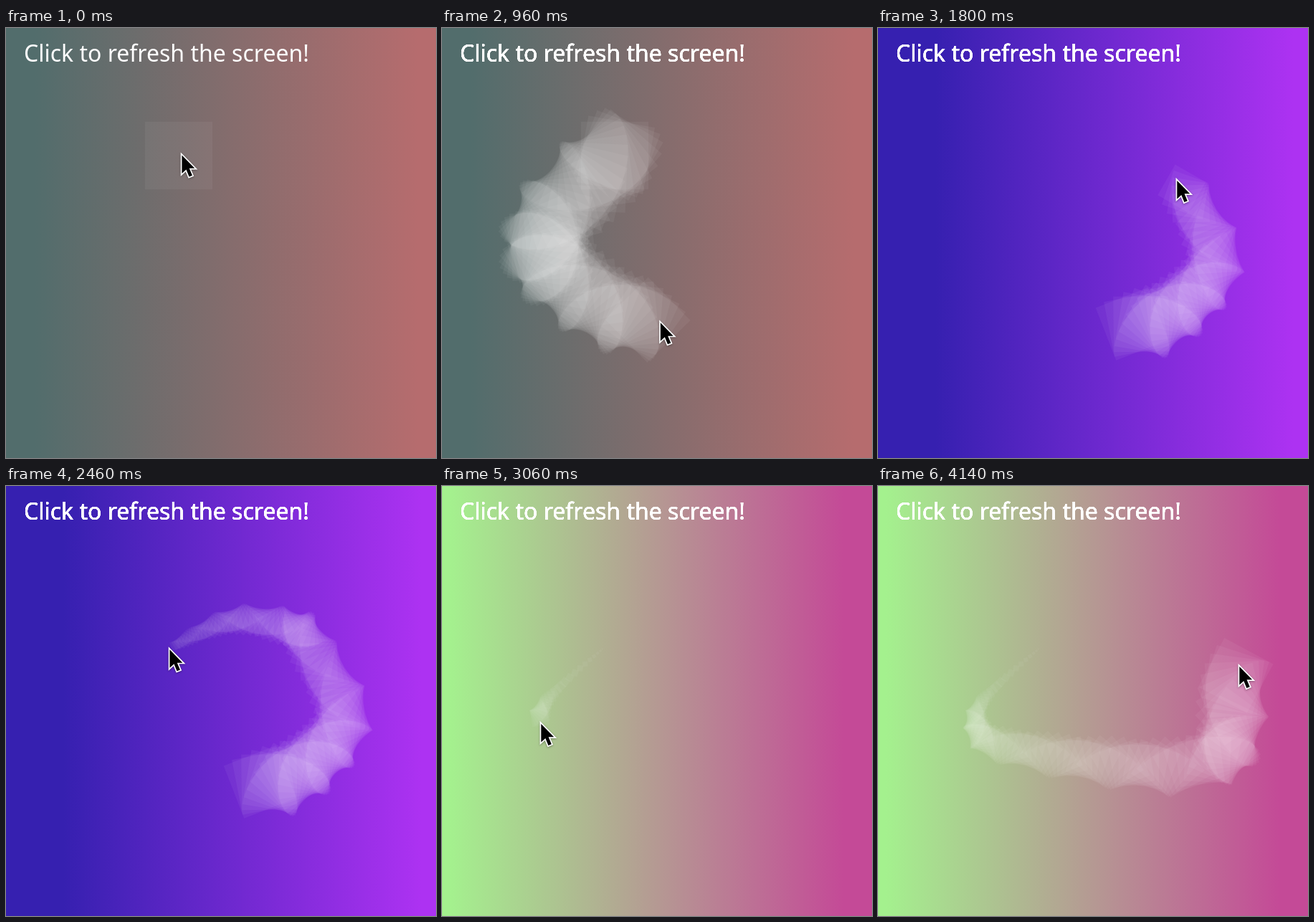
An HTML page with a canvas that plays this animation: 600x600 px, repeating every 4.2 s.

```html
<!DOCTYPE html>
<html lang="en">
<head>
<meta charset="utf-8">
<title>Refresh the screen</title>
<style>
  html, body { margin: 0; width: 100%; height: 100%; overflow: hidden; }
  canvas { display: block; width: 600px; height: 600px; }
</style>
</head>
<body>
<canvas id="stage" width="600" height="600"></canvas>
<script>
const ctx = document.getElementById('stage').getContext('2d');
const LOOP = 4200, FRAME = 60, STEP = 1000 / 60;
const CURSOR_LEAD = 35;

// Each click clears the stage to a new two-colour gradient.
const scenes = [
  { start: -10, from: 40, to: 575, left: '#526d6c', right: '#b66c6e' },
  { start: 1120, from: 80, to: 580, left: '#3620b0', right: '#ad32f2' },
  { start: 2630, from: 10, to: 560, left: '#a4f18e', right: '#c44a97' }
];

// Places the pointer passes through.
const path = [
  { t: 0, x: 241, y: 178 }, { t: 60, x: 242, y: 178 },
  { t: 300, x: 156, y: 264 }, { t: 450, x: 143, y: 308 },
  { t: 575, x: 156, y: 333 }, { t: 820, x: 240, y: 395 },
  { t: 1140, x: 357, y: 413 }, { t: 1250, x: 398, y: 405 },
  { t: 1500, x: 460, y: 350 }, { t: 1600, x: 470, y: 312 },
  { t: 1835, x: 416, y: 211 }, { t: 1920, x: 405, y: 200 },
  { t: 2150, x: 320, y: 187 }, { t: 2490, x: 228, y: 226 },
  { t: 2700, x: 221, y: 230 }, { t: 2890, x: 153, y: 292 },
  { t: 3095, x: 137, y: 330 }, { t: 3300, x: 170, y: 361 },
  { t: 3720, x: 405, y: 392 }, { t: 3830, x: 475, y: 375 },
  { t: 3960, x: 492, y: 350 }, { t: 4080, x: 495, y: 285 },
  { t: 4175, x: 503, y: 250 }
];

const clamp = (v, lo, hi) => Math.min(hi, Math.max(lo, v));
const sideAt = t => 95 * Math.abs(Math.sin(Math.PI * (t - 2650) / 4900));
const angleAt = t => 0.6165 * t * Math.PI / 180;

// Smooth curve through the path points.
function pointAt(time) {
  const last = path.length - 1;
  const t = clamp(time, path[0].t, path[last].t);
  const i = clamp(path.findIndex(p => p.t > t) - 1, 0, last - 1) || 0;
  const k = t >= path[last].t ? last - 1 : i;
  const p = path[k], q = path[k + 1], span = q.t - p.t;
  const u = (t - p.t) / span, v = 1 - u;
  const along = axis => {
    const slope = n => {
      const a = path[Math.max(0, n - 1)], b = path[Math.min(last, n + 1)];
      return (b[axis] - a[axis]) / (b.t - a.t);
    };
    return v * v * (1 + 2 * u) * p[axis] + u * u * (1 + 2 * v) * q[axis]
      + span * u * v * (v * slope(k) - u * slope(k + 1));
  };
  return [along('x'), along('y')];
}

for (const scene of scenes) {
  scene.fill = ctx.createLinearGradient(scene.from, 0, scene.to, 0);
  scene.fill.addColorStop(0, scene.left);
  scene.fill.addColorStop(1, scene.right);
}

function drawSquare(t) {
  const side = sideAt(t);
  ctx.save();
  ctx.translate(...pointAt(t));
  ctx.rotate(angleAt(t));
  ctx.fillStyle = 'rgba(255, 255, 255, 0.048)';
  ctx.fillRect(-side / 2, -side / 2, side, side);
  ctx.restore();
}

const arrow = new Path2D('M1.3 2V27.5L7.3 22L11.4 32L15.8 30.2L11.6 20.3H19.2Z');

function drawCursor(t) {
  ctx.save();
  ctx.translate(...pointAt(t));
  ctx.lineWidth = 3.4;
  ctx.strokeStyle = '#fff';
  ctx.shadowColor = 'rgba(0, 0, 0, 0.35)';
  ctx.shadowBlur = 3;
  ctx.shadowOffsetY = 1;
  ctx.stroke(arrow);
  ctx.shadowColor = 'transparent';
  ctx.fillStyle = '#000';
  ctx.fill(arrow);
  ctx.restore();
}

function drawText(times) {
  ctx.font = '32px "Noto Sans", "Open Sans", sans-serif';
  ctx.fillStyle = '#fff';
  // Repainting thickens the soft edges as the scene goes on.
  for (let i = 0; i < times; i++) ctx.fillText('Click to refresh the screen!', 25, 47);
}

function draw(t) {
  const scene = scenes.filter(s => s.start <= t).pop();
  ctx.fillStyle = scene.fill;
  ctx.fillRect(0, 0, 600, 600);
  const first = Math.ceil(scene.start / STEP);
  const final = Math.floor(t / STEP + 0.001);
  for (let n = first; n <= final; n++) drawSquare(n * STEP);
  drawText(clamp(final - first, 1, 6));
  drawCursor(t + CURSOR_LEAD);
}

const begin = performance.now();
let shown = -1;
function tick() {
  const t = (performance.now() - begin) % LOOP;
  const frame = Math.floor(t / FRAME);
  if (frame !== shown) draw((shown = frame) * FRAME);
  requestAnimationFrame(tick);
}
tick();
</script>
</body>
</html>
```
